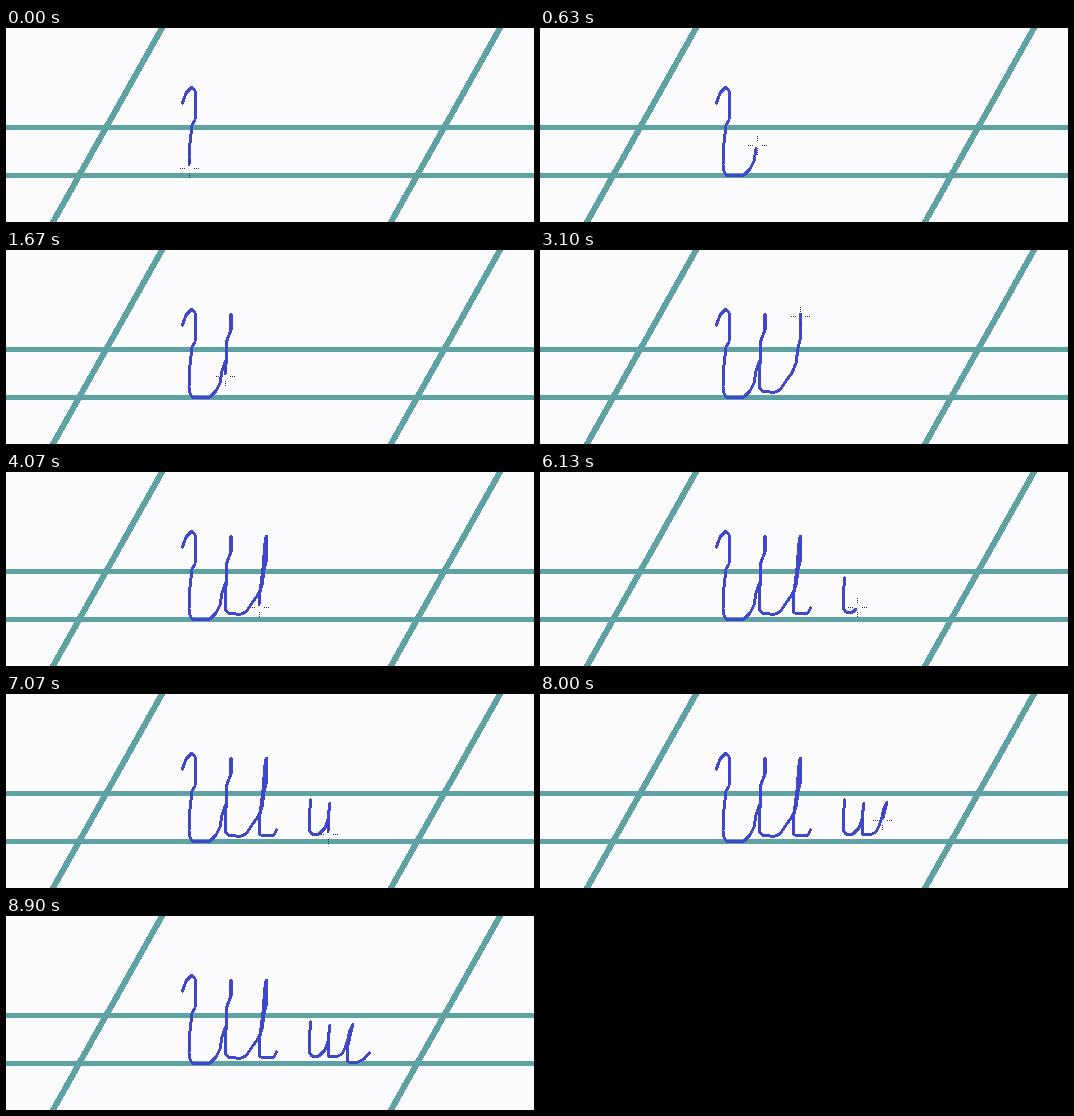
Animation of 528 by 194 pixels, one loop 9960 ms. Source, as an HTML page:

```html
<!DOCTYPE html>
<html lang="en">
<head>
<meta charset="utf-8">
<title>Handwriting practice</title>
<style>
html, body { margin: 0; width: 100%; height: 100%; overflow: hidden; background: #fcfcfe; }
svg { display: block; width: 528px; height: 194px; shape-rendering: crispEdges; }
#rules { stroke: #5ea2a4; stroke-width: 5; }
#ink { fill: none; stroke: #3f48cc; stroke-width: 3; stroke-linecap: round; stroke-linejoin: round; }
#cursor { fill: none; stroke: #333; stroke-width: 1; stroke-dasharray: 1 1; }
</style>
</head>
<body>
<svg viewBox="0 0 528 194">
  <g id="rules">
    <path d="M0 99.5H528M0 147.5H528"/>
    <path d="M158.8-5L44.2 199M496.8-5L382.2 199" stroke-width="6"/>
  </g>
  <g id="ink"></g>
  <path id="cursor" d="M-9.5 0h6M4.5 0h6M0-9.5v6M0 4.5v6"/>
</svg>
<script>
const LOOP = 9960, STEP = 100 / 3, CURSOR_OFF = 8890;
const ink = document.getElementById('ink');
const cursor = document.getElementById('cursor');

// start, end, path, pen lifted
const moves = [
  [-900, 0, 'M176.5 75L180 65L186 59L189 63L189.5 71L189 92L186 97L184 115L183 137'],
  [0, 630, 'M183 137L184 143L186 147H204L210 141L214 133L216 121'],
  [630, 1200, 'M216 121L220 110L221 90L225 80V64'],
  [1270, 1670, 'M225 64L224 82L221 91L220 115L219 124'],
  [1670, 2970, 'M219 124V137L222 141L234 142.5L240 140L246 131L252 123L256 113L258 98L260.5 88V64'],
  [3030, 3100, 'M260.5 64V66', true],
  [3270, 4400, 'M260 65L258.5 74L257.5 92L255 112L253 128V140L255 141H268L270.5 136'],
  [4470, 5100, 'M271 136L285 121L306 106', true],
  [5540, 6530, 'M304.5 106L303.5 123V137L306 140H313L319 134L322 125L324 109'],
  [6570, 6670, 'M324 109L325 111', true],
  [6940, 7070, 'M324 109L322 123V138'],
  [7070, 7730, 'M322 138L323 140.5H331L336 138L339 132L342 123L344 114L347 108'],
  [7840, 8500, 'M347 108L344 120L341 134V145L344 146.5H351L358 143L363.5 137'],
  [8530, 8800, 'M364 137L420 108L498 47', true],
  [8840, 8870, 'M498 47L464 80', true]
].map(([start, end, d, lifted]) => {
  const path = document.createElementNS('http://www.w3.org/2000/svg', 'path');
  path.setAttribute('d', d);
  path.style.display = 'none';
  ink.append(path);
  return { start, end, path, lifted, length: path.getTotalLength() };
});

const progress = (m, t) => Math.min(1, Math.max(0, (t - m.start) / (m.end - m.start)));

function drawInk(t) {
  for (const m of moves) {
    if (m.lifted) continue;
    const p = progress(m, t);
    m.path.style.display = p > 0 ? '' : 'none';
    m.path.style.strokeDasharray = p < 1 ? `${p * m.length} ${m.length + 9}` : 'none';
  }
}

function placeCursor(t) {
  cursor.style.display = t < CURSOR_OFF ? '' : 'none';
  // The pointer runs one step ahead of the ink.
  const now = t + STEP;
  const m = moves.filter(move => move.start <= now).pop();
  const { x, y } = m.path.getPointAtLength(progress(m, now) * m.length);
  cursor.setAttribute('transform', `translate(${Math.floor(x) + .5} ${Math.floor(y) + .5})`);
}

function render(ms) {
  const t = Math.floor((ms % LOOP + 4) / STEP) * STEP;
  drawInk(t);
  placeCursor(t);
}

const begin = performance.now();
function tick() {
  render(performance.now() - begin);
  requestAnimationFrame(tick);
}
tick();
</script>
</body>
</html>
```
